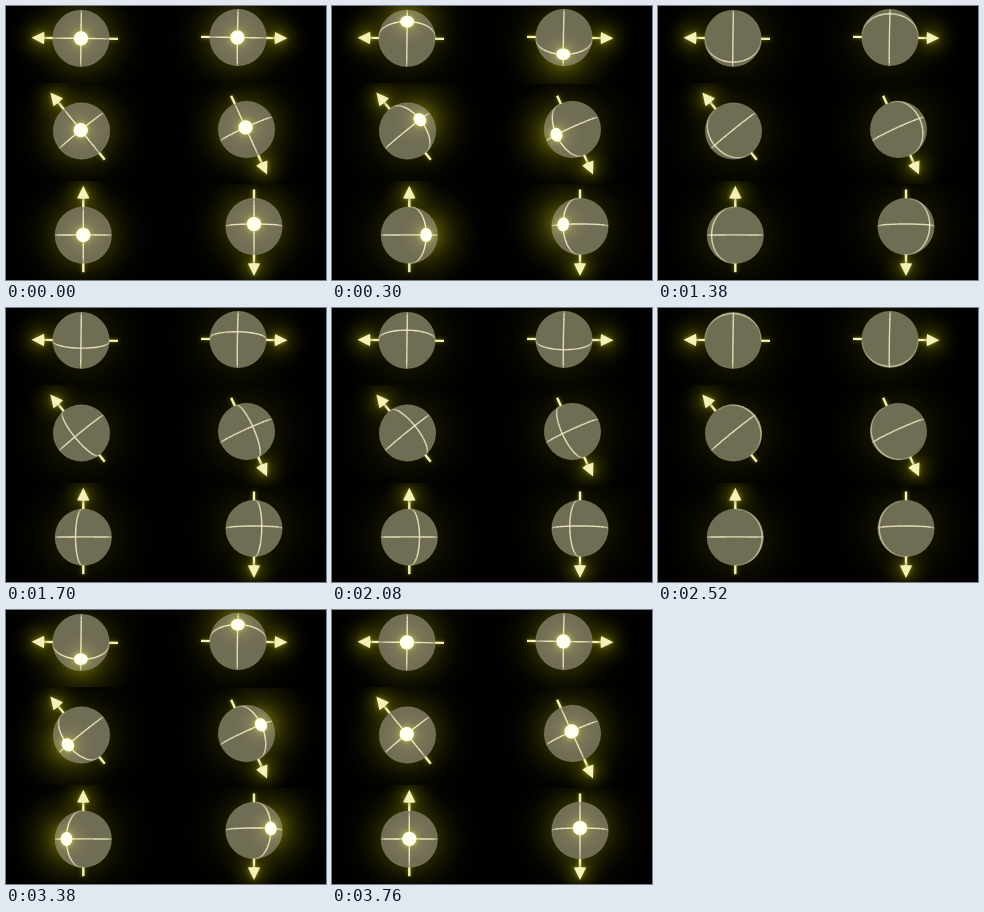
An HTML page with a canvas for the animation above (3.78 s loop, 320 by 274 pixels).

```html
<!DOCTYPE html>
<html lang="en">
<head>
<meta charset="utf-8">
<title>Spinning spheres</title>
<style>
html, body { margin: 0; width: 100%; height: 100%; overflow: hidden; background: #000; }
canvas { display: block; width: 320px; height: 274px; }
</style>
</head>
<body>
<canvas id="stage" width="320" height="274"></canvas>
<script>
const ctx = document.getElementById('stage').getContext('2d');
const { sin, cos, PI, sqrt, max, min, floor } = Math;
const RAD = PI / 180;
const LOOP = 3780;
const STEP_ANGLE = 4.5 * RAD;
const R = 28.2;
const EYE = 6;                       // camera distance in sphere radii
const FOCAL = sqrt(EYE * EYE - 1);
const HORIZON = 1 / EYE;

// centre, axis direction on screen, tilt of the axis towards the viewer, cell
const spheres = [
  { x: 75,    y: 32.4,  dir: 180.7, tilt: 0,    cell: [0, 0, 156, 77] },
  { x: 232,   y: 31.5,  dir: 0.9,   tilt: 1,    cell: [156, 0, 164, 78] },
  { x: 75.5,  y: 125,   dir: 231,   tilt: -2,   cell: [0, 77, 156, 98] },
  { x: 240.5, y: 123.5, dir: 65.5,  tilt: 4,    cell: [156, 78, 164, 100] },
  { x: 77.3,  y: 229.2, dir: 270,   tilt: -0.5, cell: [0, 175, 156, 99] },
  { x: 248,   y: 220.5, dir: 90,    tilt: 4.3,  cell: [156, 178, 164, 96] }
];

function glow(x, y, r, rgb, alpha) {
  const g = ctx.createRadialGradient(x, y, 0, x, y, r);
  for (let i = 0; i <= 6; i++) {
    g.addColorStop(i / 6, `rgba(${rgb},${alpha * (1 - i / 6) ** 2})`);
  }
  ctx.globalCompositeOperation = 'lighter';
  ctx.fillStyle = g;
  ctx.fillRect(x - r, y - r, 2 * r, 2 * r);
  ctx.globalCompositeOperation = 'source-over';
}

// u runs along the axis, v along the spin, w towards the viewer
function project(s, u, v, w) {
  const t = s.tilt * RAD, d = s.dir * RAD;
  const a = u * cos(t) - w * sin(t);
  const z = w * cos(t) + u * sin(t);
  const k = R * FOCAL / (EYE - z);
  return {
    x: s.x + k * (a * cos(d) - v * sin(d)),
    y: s.y + k * (a * sin(d) + v * cos(d)),
    z
  };
}

// Great circle through the viewer's side, fading towards the horizon.
function circleLine(s, pointAt) {
  ctx.lineWidth = 1.4;
  let last = project(s, ...pointAt(0));
  for (let i = 1; i <= 90; i++) {
    const p = project(s, ...pointAt(i * 4 * RAD));
    const depth = min(p.z, last.z) - HORIZON;
    if (depth > -0.16) {
      ctx.strokeStyle = `rgba(240,236,194,${min(0.95, 0.3 + 1.3 * max(0, depth))})`;
      ctx.beginPath();
      ctx.moveTo(last.x, last.y);
      ctx.lineTo(p.x, p.y);
      ctx.stroke();
    }
    last = p;
  }
}

function arrow(s) {
  ctx.save();
  ctx.translate(s.x, s.y);
  ctx.rotate(s.dir * RAD);
  ctx.shadowColor = '#7c7a10';
  ctx.shadowBlur = 4;
  ctx.fillStyle = '#f3f0b8';
  ctx.fillRect(-37, -1.2, 76, 2.4);
  ctx.beginPath();
  ctx.moveTo(49.5, 0);
  ctx.lineTo(37, -6.2);
  ctx.quadraticCurveTo(35.8, 0, 37, 6.2);
  ctx.fill();
  ctx.restore();
}

function spot(s, angle) {
  const lift = 1.01, size = 10 * RAD;
  ctx.beginPath();
  for (let i = 0; i < 36; i++) {
    const b = i * 10 * RAD;
    const n = lift * cos(size), e = lift * sin(size);
    const p = project(s, e * cos(b),
      n * sin(angle) + e * sin(b) * cos(angle),
      n * cos(angle) - e * sin(b) * sin(angle));
    ctx.lineTo(p.x, p.y);
  }
  ctx.closePath();
  ctx.save();
  ctx.shadowColor = '#d0ce40';
  ctx.shadowBlur = 4;
  ctx.fillStyle = ctx.strokeStyle = '#fffff0';
  ctx.lineWidth = 2.6;
  ctx.lineJoin = 'round';
  ctx.stroke();
  ctx.shadowBlur = 0;
  ctx.fill();
  ctx.restore();
}

function drawSphere(s, angle) {
  const dir = s.dir * RAD;
  const dot = project(s, 0, sin(angle), cos(angle));
  const shine = min(1, max(0, cos(angle) + 0.35));

  ctx.save();
  ctx.beginPath();
  ctx.rect(...s.cell);
  ctx.clip();

  glow(s.x, s.y, 78, '80,79,4', 0.5);
  glow(s.x + 42 * cos(dir), s.y + 42 * sin(dir), 30, '120,118,0', 0.5);
  if (shine) glow(dot.x, dot.y, 60, '110,108,4', 0.65 * shine);
  arrow(s);

  const facing = dot.z > HORIZON;
  if (!facing && cos(angle) > -0.3) spot(s, angle);

  ctx.beginPath();
  ctx.arc(s.x, s.y, R, 0, 2 * PI);
  ctx.fillStyle = '#706d55';
  ctx.fill();
  ctx.strokeStyle = 'rgba(190,186,140,.3)';
  ctx.lineWidth = 0.8;
  ctx.stroke();

  circleLine(s, a => [0, sin(a), cos(a)]);
  circleLine(s, a => [sin(a), cos(a) * sin(angle), cos(a) * cos(angle)]);

  if (shine) glow(dot.x, dot.y, 28, '90,88,20', 0.5 * shine);
  if (facing) spot(s, angle);
  ctx.restore();
}

// Steps last 20, 100 and 20 ms in turn.
function stepAt(t) {
  const part = t % 140;
  return floor(t / 140) * 3 + (part < 20 ? 0 : part < 120 ? 1 : 2);
}

const start = performance.now();
let shown = -1;

function frame() {
  const step = stepAt((performance.now() - start) % LOOP);
  if (step !== shown) {
    shown = step;
    ctx.fillStyle = '#000';
    ctx.fillRect(0, 0, 320, 274);
    spheres.forEach(s => drawSphere(s, step * STEP_ANGLE));
  }
  requestAnimationFrame(frame);
}
frame();
</script>
</body>
</html>
```
